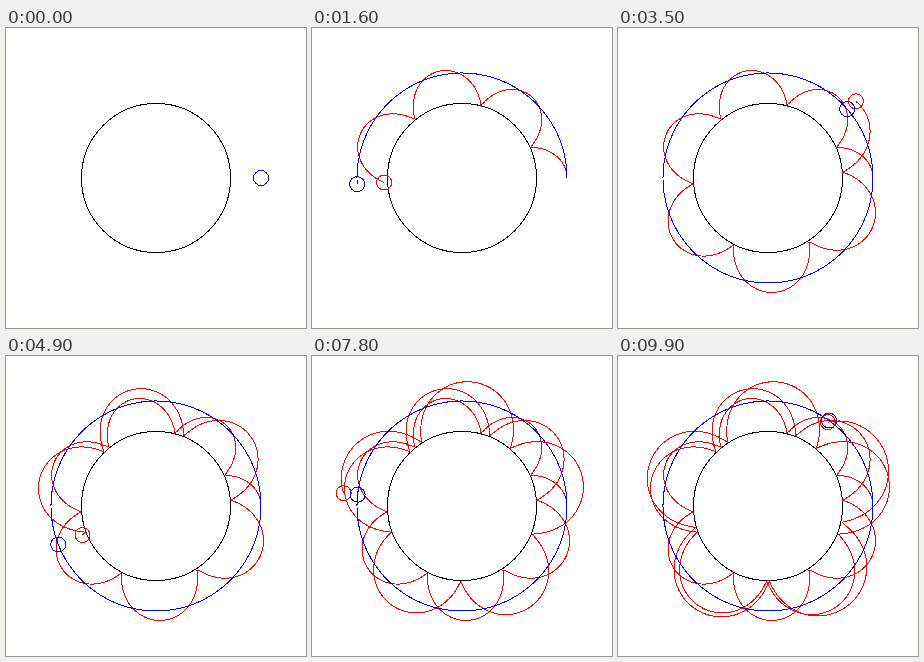
Animation of 300x300 px, one loop 10 s. Source, as an HTML page:

```html
<!DOCTYPE html>
<html lang="en">
<head>
<meta charset="utf-8">
<title>Bouncing orbit</title>
<style>
  html, body { margin: 0; width: 100%; height: 100%; overflow: hidden; background: #fff; }
  svg { display: block; width: 100vw; height: 100vh; }
</style>
</head>
<body>
<svg viewBox="0 0 300 300" fill="none" stroke-width="1" shape-rendering="crispEdges">
  <circle cx="150" cy="150" r="74.5" stroke="#000"/>
  <polyline id="bounceTrail" stroke="#f00"/>
  <polyline id="orbitTrail" stroke="#00f"/>
  <circle id="bouncer" r="7.5" stroke="#f00"/>
  <circle id="orbiter" r="7.5" stroke="#00f"/>
</svg>
<script>
const CENTER = 150, PLANET = 75, ORBIT = 105;
const FRAME_MS = 100, FRAMES = 100, SUBSTEPS = 10, STEP = 0.02;

// Angles, in degrees, at which the falling body touches the planet.
const touches = [-24.2, 24.2, 75.2, 128.8, 184.4, 242.7, 302.9, 364.5, 428.3, 493.8,
  560.2, 629, 698.2, 769.9, 842.4, 916.5, 991, 1067.5, 1145.3];

// Time along a radial fall under inverse-square gravity.
const fallTime = p => p + Math.sin(p) * Math.cos(p);

function bounceRadius(angle) {
  const deg = angle * 180 / Math.PI;
  let i = 0;
  while (i < touches.length - 2 && deg >= touches[i + 1]) i++;
  const span = touches[i + 1] - touches[i];
  const apex = ORBIT + (span - 48.4) / 1.24;
  const edge = Math.acos(Math.sqrt(PLANET / apex));
  const s = 2 * (deg - touches[i]) / span - 1;
  const time = s * fallTime(edge);
  let p = s * edge;
  for (let k = 0; k < 5; k++) p -= (fallTime(p) - time) / (2 * Math.cos(p) ** 2);
  return apex * Math.cos(p) ** 2;
}

const place = (angle, r) => [
  +(CENTER + r * Math.cos(angle)).toFixed(2),
  +(CENTER - r * Math.sin(angle)).toFixed(2)
];

const orbitPath = [], bouncePath = [];
for (let i = 0; i <= FRAMES * SUBSTEPS; i++) {
  const angle = i * STEP;
  orbitPath.push(place(angle, ORBIT));
  bouncePath.push(place(angle, bounceRadius(angle)));
}

const byId = id => document.getElementById(id);

function show(trail, dot, path, last) {
  trail.setAttribute('points', last ? path.slice(0, last + 1).join(' ') : '');
  dot.setAttribute('cx', path[last][0]);
  dot.setAttribute('cy', path[last][1]);
}

let shown = -1;
function draw(ms) {
  const frame = Math.floor(ms / FRAME_MS) % FRAMES;
  if (frame === shown) return;
  shown = frame;
  show(byId('bounceTrail'), byId('bouncer'), bouncePath, frame * SUBSTEPS);
  show(byId('orbitTrail'), byId('orbiter'), orbitPath, frame * SUBSTEPS);
}

const start = performance.now();
function tick() {
  draw(performance.now() - start);
  requestAnimationFrame(tick);
}
tick();
</script>
</body>
</html>
```
